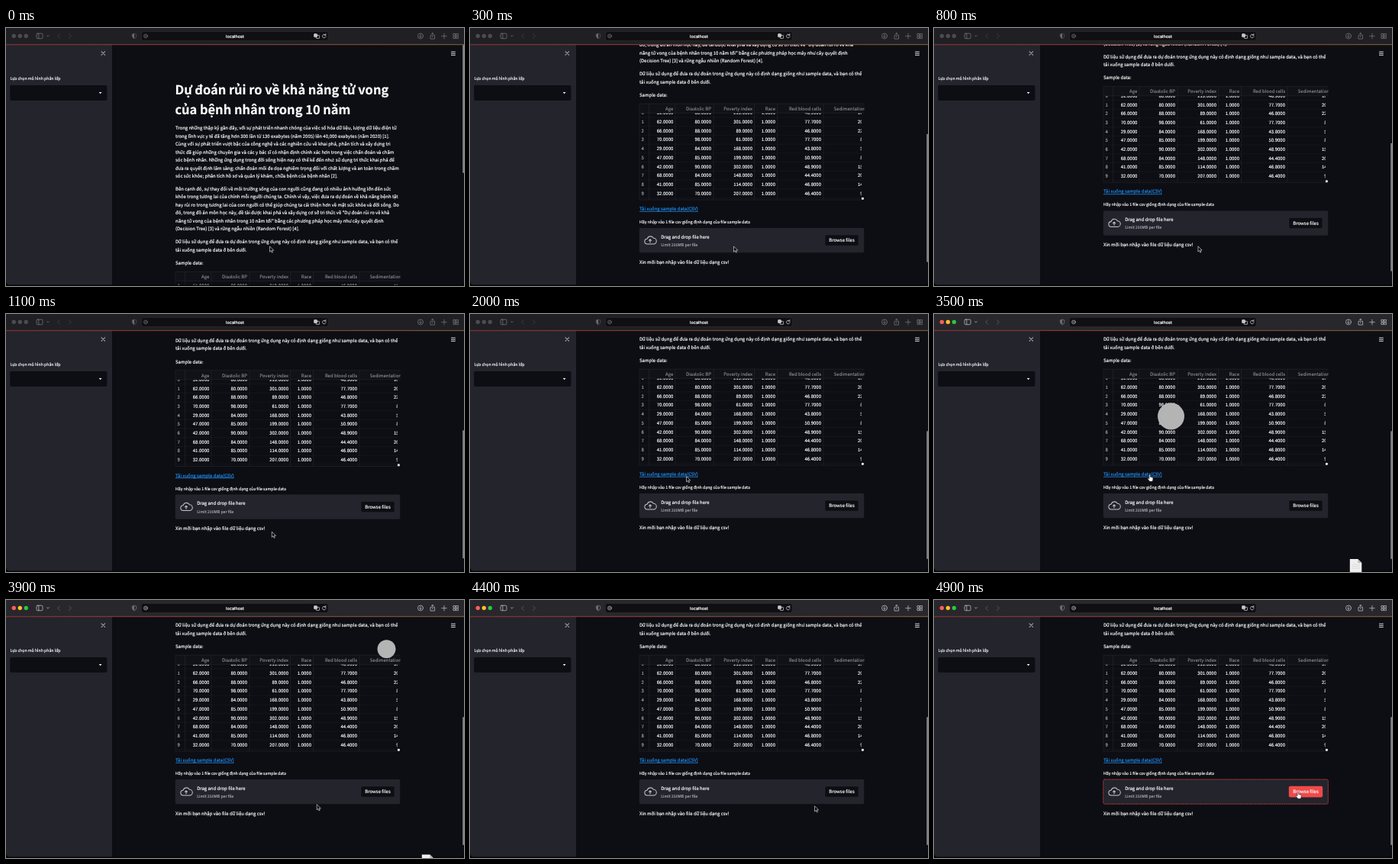
An HTML page that plays this animation: 600x338 px, repeating every 5000 ms.

```html
<!DOCTYPE html>
<html lang="vi">
<head>
<meta charset="utf-8">
<title>localhost</title>
<style>
  html, body { margin: 0; width: 100%; height: 100%; overflow: hidden; background: #0d0e13; }
  svg { display: block; width: 100vw; height: 100vh; }
  text {
    font-family: "Noto Sans CJK JP", "Noto Sans CJK SC", "Noto Sans CJK KR", "Noto Sans", sans-serif;
    font-size: 5.98px; color: #fff; fill: currentColor; stroke: currentColor; stroke-width: .16px;
    text-rendering: geometricPrecision; white-space: pre;
  }
  text.title { font-size: 16.46px; font-weight: 700; }
  text.small { font-size: 5.23px; }
  text.dim { color: #a6a7ae; }
  text.head { color: #94959c; stroke-width: .08px; }
  text.link { color: #1f8cf0; text-decoration: underline; }
  text.end { text-anchor: end; }
  text.mid { text-anchor: middle; }
  text.address { font-family: Inter, Roboto, sans-serif; font-size: 5.5px; font-weight: 500; text-anchor: middle; }
  .icon { fill: none; stroke-width: .8; stroke-linecap: round; stroke-linejoin: round; }
</style>
</head>
<body>
<svg viewBox="0 0 600 338" preserveAspectRatio="none">
  <defs>
    <clipPath id="pageClip"><rect x="139" y="22" width="461" height="316"/></clipPath>
    <clipPath id="rowClip"><rect x="222" y="331" width="290.8" height="114"/></clipPath>
    <clipPath id="headClip"><rect x="222" y="319" width="294.5" height="13"/></clipPath>
    <linearGradient id="stripe"><stop stop-color="#ff4b4b"/><stop offset="1" stop-color="#e8a860"/></linearGradient>
  </defs>
  <rect width="600" height="338" fill="#0d0e13"/>
  <g clip-path="url(#pageClip)"><g id="page"></g></g>

  <rect y="22" width="139" height="316" fill="#23242c"/>
  <path class="icon" d="M125 30.8l4.6 4.6m0-4.6l-4.6 4.6" stroke="#9c9da3" style="stroke-width:1.2"/>
  <text class="small" x="5.4" y="68.4">Lựa chọn mô hình phân lớp</text>
  <rect x="5.3" y="75" width="127" height="20" rx="1.8" fill="#0d0e13"/>
  <path d="M121.7 84h3.8l-1.9 2.2z" fill="#fff"/>
  <path class="icon" d="M583.4 31.2h5m-5 2.2h5m-5 2.2h5" stroke="#e8e8ea" style="stroke-width:.9"/>
  <rect id="thumb" x="598.2" y="22" width="1.8" height="168" rx=".8" fill="#85868b"/>
  <path d="M0 331q0 5.6 5.5 5.6H594.5q5.5 0 5.5-5.6V338H0z" fill="#060607"/>

  <rect id="toolbar" width="600" height="21.5"/>
  <rect y="21.3" width="600" height=".9" fill="url(#stripe)" opacity=".62"/>
  <g id="lights"></g>
  <rect x="177.3" y="4.4" width="245" height="12.4" rx="3" fill="#101013" stroke="#34333a" stroke-width=".6"/>
  <text class="address" x="300" y="12.8">localhost</text>
  <g id="icons" class="icon">
    <rect x="40" y="7.2" width="8" height="6.6" rx="1.2"/>
    <path d="M42.8 7.2v6.6M53.6 9.8l1.4 1.4 1.4-1.4"/>
    <path d="M70.4 7.8l-2.6 2.8 2.6 2.8m12.2-5.6l2.6 2.8-2.6 2.8" opacity=".4"/>
    <path d="M165.4 8.2l2.7-1 2.7 1v2.6q0 2-2.7 3.2-2.7-1.2-2.7-3.2z" opacity=".55"/>
    <path d="M168.1 7.2l-2.7 1v2.6q0 2 2.7 3.2z" fill="#6d6c71" stroke="none"/>
    <circle cx="183" cy="10.6" r="2.4"/><path d="M182 10.6h2"/>
    <g stroke="#c8c8cb">
      <rect x="403.6" y="7.8" width="4" height="4" rx=".7" fill="#c8c8cb"/><rect x="406.4" y="9.6" width="4.2" height="4" rx=".7"/>
      <path d="M418.6 9.2a2.3 2.3 0 1 0 .5 1.7M418.9 7.6v1.8h-1.8"/>
    </g>
    <circle cx="543" cy="10.5" r="3.5"/><path d="M543 8.6v3.6m-1.4-1.4l1.4 1.4 1.4-1.4"/>
    <path d="M557.2 9.6h-1.2v4.6h5.6V9.6h-1.2M558.8 11.8V6.4m-1.5 1.5l1.5-1.5 1.5 1.5"/>
    <path d="M574 7.4v6.6m-3.3-3.3h6.6"/>
    <path d="M586.3 7.6h2.5v2.5h-2.5zm3.6 0h2.5v2.5h-2.5zm-3.6 3.6h2.5v2.5h-2.5zm3.6 0h2.5v2.5h-2.5z"/>
  </g>

  <g id="file">
    <path d="M0 0h10.5l5 5v17H0z" fill="#efefef"/>
    <path d="M10.5 0v5h5z" fill="#b9b9b9"/>
    <path d="M2.5 7h10m-10 2.5h10m-10 2.5h10" stroke="#cfcfcf" stroke-width=".6"/>
  </g>
  <circle id="badge" fill="#b4b4b4"/>
  <path id="arrow" d="M0 0v7.2l1.7-1.5 1.1 2.5 1.2-.5-1.1-2.5h2.3z" fill="#08080a" stroke="#f4f4f4" stroke-width=".6" stroke-linejoin="round"/>
  <path id="hand" d="M-.9 3.4V-.6q0-.9.8-.9t.8.9v2.2l2.7.7q.9.3.8 1.2l-.4 2.4-.5 1.4H-.3L-2.6 4.2q-.5-.8.1-1.1.6-.3 1.6.8z" fill="#fff" stroke="#111" stroke-width=".5" stroke-linejoin="round"/>
</svg>
<script>
const LOOP = 5000, STEP = 100, SCROLL_END = 247;
const $ = id => document.getElementById(id);
const clamp01 = v => Math.max(0, Math.min(1, v));
const smooth = v => { v = clamp01(v); return v * v * (3 - 2 * v); };

function add(parent, tag, attrs, content = '') {
  const node = document.createElementNS('http://www.w3.org/2000/svg', tag);
  for (const key in attrs) node.setAttribute(key, attrs[key]);
  node.textContent = content;
  parent.appendChild(node);
  return node;
}
const write = (parent, x, y, content, cls = '') => add(parent, 'text', { x, y, class: cls }, content);
const paragraph = (y, lines) => lines.forEach((line, i) => write(page, 222, y + i * 10.54, line));

const page = $('page');
write(page, 221.4, 87.2, 'Dự đoán rủi ro về khả năng tử vong', 'title');
write(page, 221.4, 112.8, 'của bệnh nhân trong 10 năm', 'title');
paragraph(133.2, [
  'Trong những thập kỷ gần đây, với sự phát triển nhanh chóng của việc số hóa dữ liệu, lượng dữ liệu điện tử',
  'trong lĩnh vực y tế đã tăng hơn 300 lần từ 130 exabytes (năm 2005) lên 40,000 exabytes (năm 2020) [1].',
  'Cùng với sự phát triển vượt bậc của công nghệ và các nghiên cứu về khai phá, phân tích và xây dựng tri',
  'thức đã giúp những chuyên gia và các y bác sĩ có nhận định chính xác hơn trong việc chẩn đoán và chăm',
  'sóc bệnh nhân. Những ứng dụng trong đời sống hiện nay có thể kể đến như: sử dụng tri thức khai phá để',
  'đưa ra quyết định lâm sàng; chẩn đoán mối đe dọa nghiêm trọng đối với chất lượng và an toàn trong chăm',
  'sóc sức khỏe; phân tích hồ sơ và quản lý khám, chữa bệnh của bệnh nhân [2].'
]);
paragraph(212.6, [
  'Bên cạnh đó, sự thay đổi về môi trường sống của con người cũng đang có nhiều ảnh hưởng lớn đến sức',
  'khỏe trong tương lai của chính mỗi người chúng ta. Chính vì vậy, việc đưa ra dự đoán về khả năng bệnh tật',
  'hay rủi ro trong tương lai của con người có thể giúp chúng ta cải thiện hơn về mặt sức khỏe và đời sống. Do',
  'đó, trong đồ án môn học này, đề tài được khai phá và xây dựng cơ sở tri thức về "Dự đoán rủi ro về khả',
  'năng tử vong của bệnh nhân trong 10 năm tới" bằng các phương pháp học máy như cây quyết định',
  '(Decision Tree) [3] và rừng ngẫu nhiên (Random Forest) [4].'
]);
paragraph(282.3, [
  'Dữ liệu sử dụng để đưa ra dự đoán trong ứng dụng này có định dạng giống như sample data, và bạn có thể',
  'tải xuống sample data ở bên dưới.'
]);
write(page, 222, 310, 'Sample data:');

// Data table: fixed header over rows that scroll a little.
const columns = [['Age', 266.3], ['Diastolic BP', 316], ['Poverty index', 370], ['Race', 400], ['Red blood cells', 460]];
const records = [
  [51, 80, 219, 46.9, 10], [62, 80, 301, 77.7, 20], [66, 88, 89, 46.8, 22], [70, 98, 61, 77.7, 8],
  [29, 84, 168, 43.8, 5], [47, 85, 199, 50.9, 8], [42, 90, 302, 48.9, 15], [68, 84, 148, 44.4, 20],
  [41, 85, 114, 46.8, 14], [32, 70, 207, 46.4, 9]
];
const ROW = 11.69;
const rows = add(add(page, 'g', { 'clip-path': 'url(#rowClip)' }), 'g', {});
records.forEach(([age, pressure, poverty, cells, rate], i) => {
  const y = 333.4 + i * ROW;
  write(rows, 226.2, y, i, 'mid dim');
  [age, pressure, poverty, 1, cells].forEach((value, c) => write(rows, columns[c][1], y, value.toFixed(4), 'end'));
  write(rows, 529.6, y, rate.toFixed(4), 'end');
  add(rows, 'path', { d: `M222 ${y + 3.8}H513`, stroke: '#1c1d23', 'stroke-width': .5 });
});
const header = add(page, 'g', { 'clip-path': 'url(#headClip)' });
add(header, 'rect', { x: 222, y: 319, width: 295, height: 12.4, fill: '#101218' });
columns.forEach(([name, x]) => write(header, x, 328, name, 'end head'));
write(header, 476.8, 328, 'Sedimentation rate', 'head');
add(page, 'path', {
  d: 'M222 319.2H516.5M222 331.4H516.5M222 319V445H513' + [234.5, 269, 319, 372.5, 402.5, 463].map(x => `M${x} 319V445`).join(''),
  fill: 'none', stroke: '#292a31', 'stroke-width': .5
});
add(page, 'rect', { x: 513, y: 442, width: 2.8, height: 2.8, fill: '#f2f2f2' });

write(page, 222, 459, 'Tải xuống sample data(CSV)', 'link');
write(page, 222, 476, 'Hãy nhập vào 1 file csv giống định dạng của file sample data', 'small');
const dropzone = add(page, 'rect', { x: 221.7, y: 482, width: 294.6, height: 32.3, rx: 1.8, fill: '#23242c', 'stroke-width': .8, 'stroke-dasharray': '1.6 .8' });
add(page, 'path', {
  d: 'M232.4 503a3.4 3.4 0 0 1-.3-6.8a4.4 4.4 0 0 1 8.2-.9a3.8 3.8 0 0 1 .2 7.7zM236 501.2v-4.4m-1.8 1.8l1.8-1.8 1.8 1.8',
  fill: 'none', stroke: '#c6c7cc', 'stroke-width': 1.05, 'stroke-linejoin': 'round'
});
write(page, 250.2, 495.8, 'Drag and drop file here');
write(page, 250.2, 506, 'Limit 200MB per file', 'small dim');
const button = add(page, 'rect', { x: 465, y: 491, width: 44, height: 14.2, rx: 1.8, 'stroke-width': .4 });
write(page, 487, 500.2, 'Browse files', 'mid');
write(page, 222, 528.5, 'Xin mời bạn nhập vào file dữ liệu dạng csv!');

const lights = ['#ff5f57', '#febc2e', '#28c840'].map((color, i) =>
  ({ color, dot: add($('lights'), 'circle', { cx: 10.3 + i * 8, cy: 10.5, r: 2.7 }) }));

// Pointer stops: time, x, y.
const stops = [[0, 345.5, 286], [700, 345.5, 286], [1100, 348.3, 285.2], [1300, 348.3, 285.2], [1900, 284.2, 213.4],
  [2100, 282.8, 212], [3500, 282.8, 212], [3900, 407.2, 267.8], [4500, 455, 270], [4700, 477, 253], [5000, 477, 253]];

function pointerAt(t) {
  const i = stops.findIndex((stop, n) => t < stops[n + 1][0]);
  const [from, to] = [stops[i], stops[i + 1]];
  const u = smooth((t - from[0]) / (to[0] - from[0]));
  return [from[1] + (to[1] - from[1]) * u, from[2] + (to[2] - from[2]) * u];
}
const scrollAt = t => t < 300 ? 220 * smooth(t / 300)
  : t >= 1900 ? SCROLL_END : SCROLL_END - 27 * Math.exp((300 - t) / 277);

const place = (node, x, y) => node.setAttribute('transform', `translate(${x} ${y})`);
const show = (node, visible) => node.setAttribute('visibility', visible ? 'visible' : 'hidden');

function draw(t) {
  const scroll = scrollAt(t);
  place(page, 0, -scroll);
  place(rows, 0, 6.3 * (1 - clamp01(t / 200)));
  $('thumb').setAttribute('y', 22 + scroll * .531);

  const active = t >= 2200;
  $('toolbar').setAttribute('fill', active ? '#28272b' : '#201f23');
  $('icons').setAttribute('stroke', active ? '#b9b8bd' : '#747378');
  lights.forEach(({ color, dot }) => dot.setAttribute('fill', active ? color : '#4c4b50'));

  const [x, y] = pointerAt(t);
  const overButton = t >= 4700;
  const onTarget = overButton || (t >= 2100 && t <= 3500);
  show($('arrow'), !onTarget);
  show($('hand'), onTarget);
  place($('arrow'), x, y);
  place($('hand'), x, y);
  dropzone.setAttribute('stroke', t >= 4600 ? '#f04a4a' : 'none');
  button.setAttribute('fill', overButton ? '#f04a4a' : '#0d0e13');
  button.setAttribute('stroke', overButton ? '#f04a4a' : '#33343c');

  // The badge is tossed up from the link and falls to the bottom edge.
  const k = (t - 3500) / 100;
  show($('badge'), k >= 0 && k < 7);
  place($('badge'), 288 + 263 * smooth((t - 3365) / 750), 134 - 91.3 * k + 18.46 * k * k);
  $('badge').setAttribute('r', Math.max(1, 17.5 - 1.38 * k));

  const rise = smooth((t - 3000) / 300), sink = smooth((t - 3600) / 450);
  show($('file'), t >= 3000 && t < 4200);
  place($('file'), 544.8, 338 - 17 * rise + 17 * sink);
}

function frame() {
  const t = performance.now() % LOOP;
  draw(Math.floor(t / STEP) * STEP);
  requestAnimationFrame(frame);
}
frame();
</script>
</body>
</html>
```
